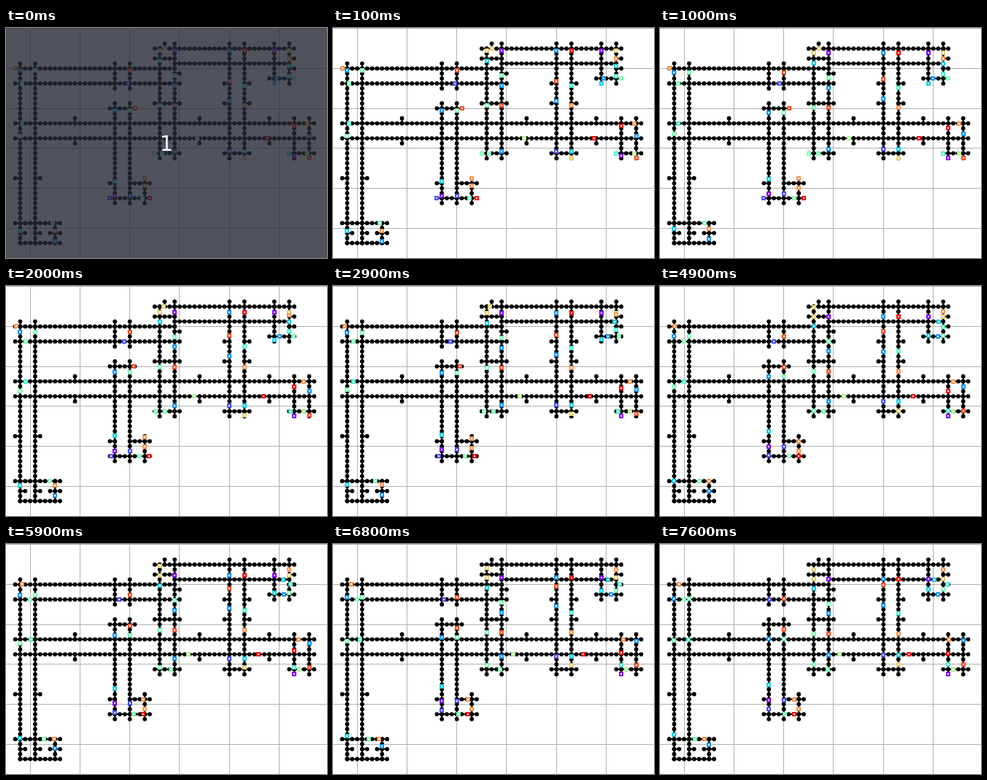
Write an HTML page with a canvas that moves like this. It is 440 px wide and 315 px high and loops after 8000 ms.

```html
<!DOCTYPE html>
<html lang="en">
<head>
<meta charset="utf-8">
<title>Road network</title>
<style>
html, body { margin: 0; width: 100%; height: 100%; overflow: hidden; background: #fff; }
canvas { display: block; }
</style>
</head>
<body>
<canvas id="stage" width="440" height="315"></canvas>
<script>
const W = 440, H = 315, LOOP = 8000;
const CELL = 6.83, GAP = 3; // cell size in pixels, cells between twin lanes
const STEP = 1.5, HEAD = 2 * STEP;
const ticks = [300, 1000, 2000, 2900, 3400, 4000, 4900, 5900, 6300, 6800, 7600];
const dirs = { up: [0, -1], down: [0, 1], left: [-1, 0], right: [1, 0], stop: [0, 0] };
const tones = 'vibctglyosr'; // violet, indigo, blue ... scarlet, red
const ctx = document.getElementById('stage').getContext('2d');
const px = col => 33.1 + col * CELL, py = row => 55.45 + row * CELL;

// Roads, in cells
const roads = [], cars = [];
const row = (y, a, b) => roads.push([a, y, b, y]);
const column = (x, a, b) => roads.push([x, a, x, b]);
const twin = (lane, at, a, b) => { lane(at, a, b); lane(at + GAP, a, b); };
// A bar crosses a twin street and sticks out one cell; stubs leave the middle open
const bar = (lane, at, street) => lane(at, street - 1, street + GAP + 1);
const stubs = (lane, at, street) => {
  lane(at, street - 1, street);
  lane(at, street + GAP, street + GAP + 1);
};

twin(row, 0, -3, 29);
twin(row, 11, -3, 57);
twin(column, -2, -1, 35);
twin(column, 17, 7, 27);
twin(column, 26, -4, 18);
twin(column, 40, -5, 18);
twin(column, 49, -5, 3);
twin(column, 53, 10, 18);
for (const x of [17, 20]) bar(column, x, 0);
for (const y of [7, 17]) bar(row, y, 26);
for (const x of [9, 34, 48]) stubs(column, x, 11);
for (const y of [3, 7]) stubs(row, y, 40);
bar(row, 8, 17);
bar(row, 17, 40);
bar(row, 17, 53);
bar(row, 2, 49);
stubs(row, 22, -2);
// Top street
row(-4, 25, 53);
row(-1, 29, 52);
row(-2, 25, 29);
for (const y of [-2, 0]) row(y, 52, 53);
for (const y of [1, 3]) row(y, 29, 30);
for (const x of [27, 29]) column(x, -5, -4);
// Lower loops
row(23, 16, 17);
row(23, 20, 24);
row(26, 16, 24);
column(23, 22, 27);
row(31, -3, 6);
row(35, -2, 6);
row(33, 4, 6);
for (const x of [-2, 1]) row(33, x, x + 1);
column(5, 31, 35);

// A car leaves a junction, and may turn after some cells
function car(tone, x, y, dir, after = 99, turn = 'stop', head = HEAD) {
  cars.push({ tone: tones.indexOf(tone) / 10, x, y, dir, after: after * CELL, turn, head });
}
// A resting car sets off two steps late
const rest = (tone, x, y, dir, after, turn) => car(tone, x, y, dir, after, turn, -HEAD);
const leave = (dir, y, list, xs) => xs.forEach((x, i) => car(list[i], x, y, dir));

leave('down', -4, 'yvbrvy', [26, 29, 40, 43, 49, 52]);
leave('down', -2, 'c', [26]);
leave('down', 0, 'bgs', [-2, 1, 20]);
leave('down', 1, 'g', [29]);
leave('down', 3, 'bt', [29, 43]);
leave('down', 7, 'gso', [26, 29, 43]);
leave('down', 8, 'bg', [17, 20]);
leave('down', 11, 'r', [53]);
leave('up', 3, 's', [40]);
leave('up', 7, 'b', [40]);
leave('up', 14, 'gb', [-2, 56]);
leave('up', 17, 'bic', [29, 40, 43]);
leave('up', 23, 'c', [17]);
leave('up', 26, 'vi', [17, 20]);
leave('up', 33, 'c', [-2]);
leave('up', 35, 'b', [5]);
leave('left', 3, 'i', [20]);
leave('left', 11, 'o', [56]);
leave('left', 14, 'lr', [34, 48]);
leave('left', 26, 'g', [23]);
leave('left', 31, 'g', [5]);
leave('right', 11, 't', [-2]);
leave('right', 17, 'g', [26]);

car('g', -2, 3, 'right', 2);
car('b', 49, 2, 'right', 2);
car('l', 56, 17, 'left', 2);
car('o', 23, 23, 'down', 2);
car('v', 53, 17, 'down', 1);
car('c', 52, 0, 'up', 1, 'left');
car('t', 52, 2, 'up', 2, 'right');
car('o', 5, 33, 'up', 2, 'left');

rest('o', -3, 0, 'right');
rest('o', 52, -2, 'up', 1);
rest('y', 27, -4, 'left', 1, 'down');
rest('s', 21, 8, 'left', 1, 'down');
rest('g', 25, 17, 'right', 1, 'up');
rest('g', 53, 2, 'left', 1, 'up');
rest('t', 52, 17, 'right', 1, 'up');
rest('i', 16, 26, 'right', 1, 'up');
rest('o', 23, 22, 'down', 1, 'left');
rest('y', 43, 18, 'up');
rest('c', 49, 3, 'up');
rest('s', 56, 18, 'up');
rest('r', 24, 26, 'left');

function rainbow(v) {
  const rgb = [Math.abs(2 * v - .5), Math.sin(Math.PI * v), Math.cos(Math.PI * v / 2)];
  return `rgb(${rgb.map(c => Math.round(255 * Math.min(1, c))).join()})`;
}

function drawRoad([x1, y1, x2, y2]) {
  ctx.beginPath();
  ctx.moveTo(px(x1), py(y1));
  ctx.lineTo(px(x2), py(y2));
  ctx.stroke();
  const n = x2 - x1 + y2 - y1;
  for (let i = 0; i <= n; i++) {
    ctx.beginPath();
    ctx.arc(px(x1 + (x2 - x1) * i / n), py(y1 + (y2 - y1) * i / n), 2.9, 0, 7);
    ctx.fill();
  }
}

function drawCar({ tone, x, y, dir, after, turn, head }, gone) {
  const d = Math.max(0, gone + head);
  const a = Math.min(d, after), b = d - a;
  const [ax, ay] = dirs[dir], [bx, by] = dirs[turn];
  const left = Math.round(px(x) + ax * a + bx * b) - 2;
  const top = Math.round(py(y) + ay * a + by * b) - 2;
  ctx.strokeStyle = rainbow(tone);
  ctx.fillRect(left, top, 4, 4);
  ctx.strokeRect(left, top, 4, 4);
}

function draw(t) {
  ctx.fillStyle = '#fff';
  ctx.fillRect(0, 0, W, H);
  ctx.fillStyle = '#b0b0b0';
  for (let i = 0; i <= 50; i += 10) ctx.fillRect(Math.floor(px(i) - .1), 0, 1, H);
  for (let j = -8; j <= 32; j += 8) ctx.fillRect(0, Math.floor(py(j)), W, 1);

  ctx.fillStyle = ctx.strokeStyle = '#000';
  ctx.lineWidth = 2;
  roads.forEach(drawRoad);

  const gone = STEP * ticks.filter(k => k <= t).length;
  ctx.fillStyle = '#fff';
  for (const c of cars) drawCar(c, gone);

  if (t < 100) {
    ctx.fillStyle = 'rgba(37, 41, 50, .8)';
    ctx.fillRect(0, 0, W, H);
    ctx.fillStyle = '#fff';
    ctx.font = '28px "DejaVu Sans", sans-serif';
    ctx.textAlign = 'center';
    ctx.fillText('1', 220, 168);
  }
}

const start = performance.now();
function tick() {
  draw((performance.now() - start) % LOOP);
  requestAnimationFrame(tick);
}
tick();
</script>
</body>
</html>
```
